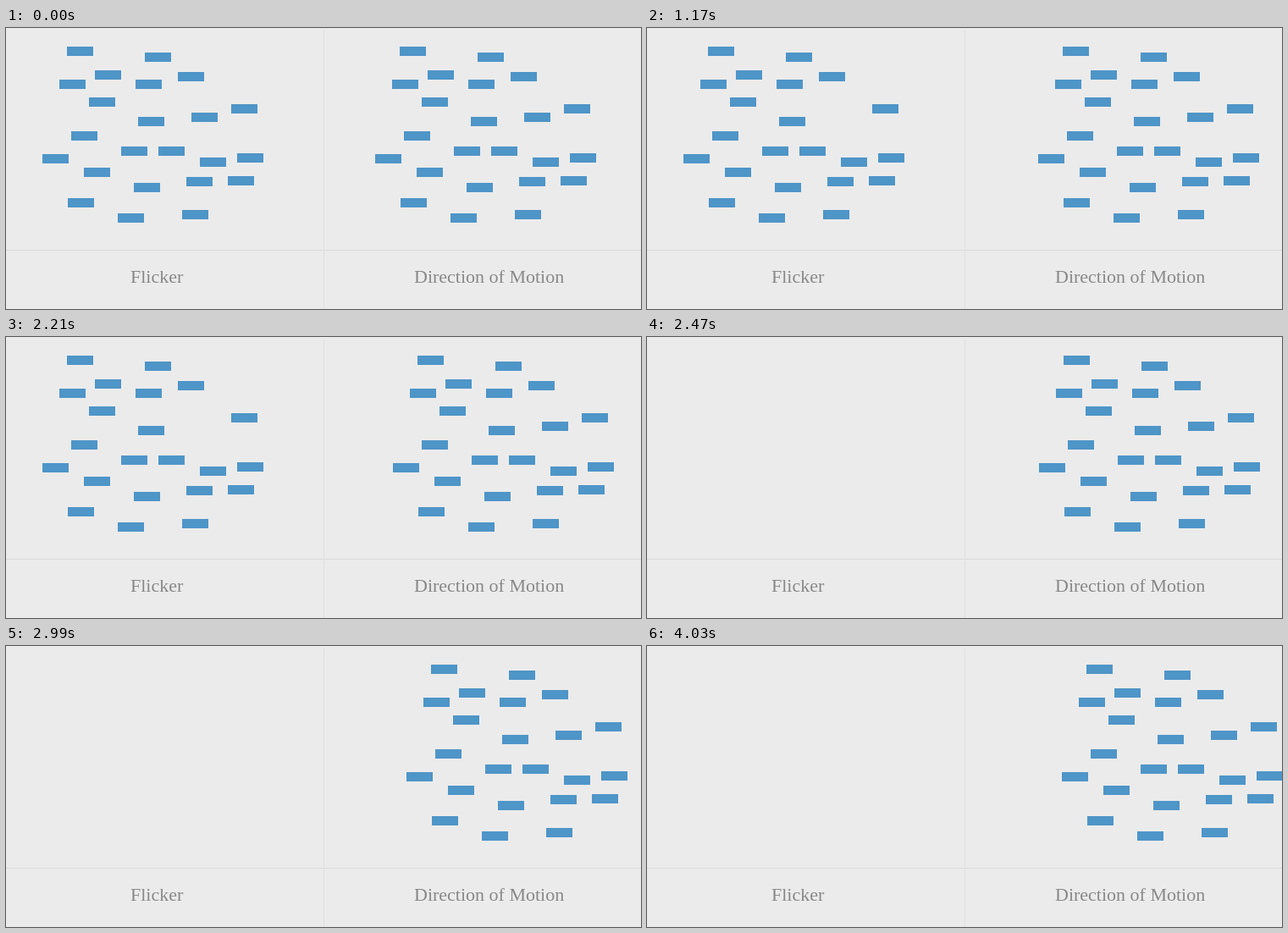
Write an HTML page that moves like this. It is 750 px wide and 332 px high and loops after 4.16 s.

```html
<!DOCTYPE html>
<html lang="en">
<head>
<meta charset="utf-8">
<title>Flicker and motion</title>
<style>
  html, body { margin: 0; width: 100%; height: 100%; overflow: hidden; background: #ebebeb; }
  svg { display: block; }
  text { font: 22px "Liberation Serif", serif; fill: #888; }
  .bar { fill: #4e95c8; }
</style>
</head>
<body>
<svg width="750" height="332" viewBox="0 0 750 332" shape-rendering="crispEdges">
  <rect y="262" width="750" height="1" fill="#dadada"/>
  <rect x="375" y="3" width="1" height="329" fill="#e0e0e0"/>
  <text x="147" y="301">Flicker</text>
  <text x="482" y="301">Direction of Motion</text>
  <g id="left"></g>
  <g id="right"></g>
</svg>
<script>
const STEP = 130, STEPS = 32, GAP = 393;
const bars = [
  [72, 22], [164, 29], [105, 50], [63, 61], [153, 61], [203, 52], [98, 82], [156, 105],
  [219, 100], [266, 90], [77, 122], [136, 140], [180, 140], [43, 149], [92, 165], [229, 153],
  [273, 148], [151, 183], [213, 176], [262, 175], [73, 201], [132, 219], [208, 215]
];
// [step, shift] stops of the moving group
const path = [[0, 0], [5, 14], [10, 29], [11, 3], [21, 33], [25, 41], [30, 54], [31, 54]];

const left = document.getElementById("left");
const right = document.getElementById("right");

function addBars(group) {
  return bars.map(([x, y]) => {
    const bar = document.createElementNS("http://www.w3.org/2000/svg", "rect");
    const attrs = { x, y, width: 31, height: 11, class: "bar" };
    for (const name in attrs) bar.setAttribute(name, attrs[name]);
    return group.appendChild(bar);
  });
}

const leftBars = addBars(left);
addBars(right);

function shiftAt(step) {
  const i = Math.max(1, path.findIndex(([s]) => s >= step));
  const [s0, v0] = path[i - 1], [s1, v1] = path[i];
  return Math.round(v0 + (v1 - v0) * (step - s0) / (s1 - s0));
}

// On odd steps one bar blinks off, or the whole group does
function isHidden(x, step) {
  if (step % 2 === 0) return false;
  if (step < 18) return x === 219;
  if (step > 24 && step < 30) return x === 213;
  return true;
}

function draw(now) {
  const step = Math.floor(now / STEP) % STEPS;
  leftBars.forEach((bar, i) => {
    bar.style.visibility = isHidden(bars[i][0], step) ? "hidden" : "visible";
  });
  right.setAttribute("transform", `translate(${GAP + shiftAt(step)} 0)`);
}

let start;
function tick(now) {
  start ??= now;
  draw(now - start);
  requestAnimationFrame(tick);
}
draw(0);
requestAnimationFrame(tick);
</script>
</body>
</html>
```
